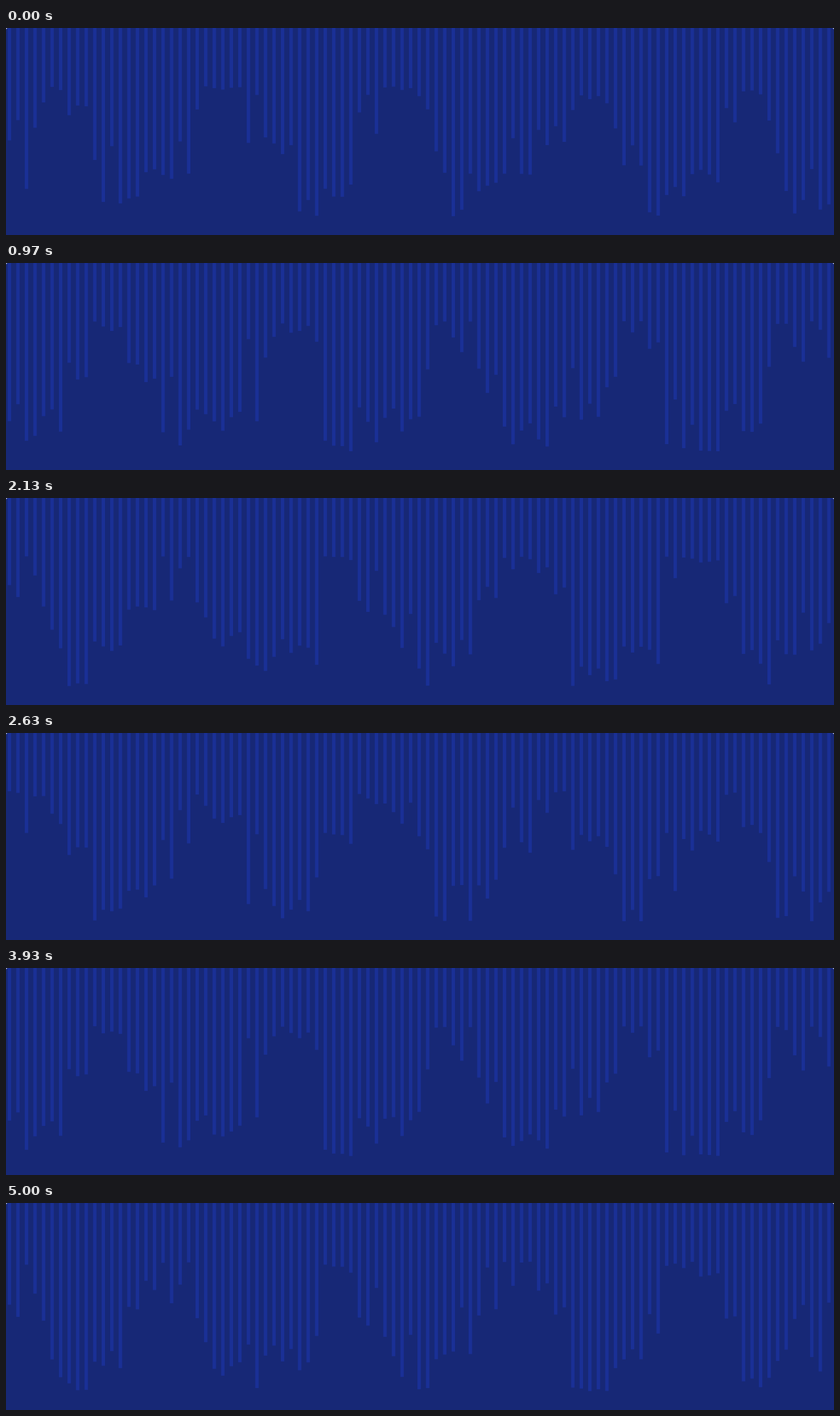
Animation of 1280 by 320 pixels, one loop 5.03 s. Source, as an HTML page with a canvas:

```html
<!DOCTYPE html>
<html lang="en">
<head>
<meta charset="utf-8">
<title>Hanging bars</title>
<style>
  html, body { margin: 0; width: 100%; height: 100%; overflow: hidden; background: #fff; }
  canvas { display: block; width: 1280px; height: 320px; border-radius: 3px 3px 0 0; }
</style>
</head>
<body>
<canvas id="stage" width="1280" height="320"></canvas>
<script>
const LOOP = 5030, CYCLE = 3000, FPS = 30;
const BARS = 97, PITCH = 1280 / BARS, LEFT = 0.2 * PITCH, WIDTH = 0.4 * PITCH;
const LEAD = 1600, LAG = 150, SPREAD = 400;

const easeIn = k => 1 - Math.cos(k * Math.PI / 2);
const easeOut = k => Math.sin(k * Math.PI / 2);
const easeBoth = k => (1 - Math.cos(k * Math.PI)) / 2;

// The cycle every bar runs through: time in ms, length in px, easing to the next key.
const KEYS = [
  [105, 176, easeOut],
  [850, 90, easeIn],
  [1185, 176, easeBoth],
  [1300, 154, easeBoth],
  [1632, 261, easeBoth],
  [1757, 225, easeBoth],
  [1925, 246, easeBoth],
  [2076, 218, easeOut],
  [2500, 291, easeBoth],
  [105 + CYCLE, 176]
];

function seeded(seed) {
  return () => {
    seed = (seed + 0x6d2b79f5) | 0;
    let n = Math.imul(seed ^ (seed >>> 15), 1 | seed);
    n = (n + Math.imul(n ^ (n >>> 7), 61 | n)) ^ n;
    return ((n ^ (n >>> 14)) >>> 0) / 4294967296;
  };
}

// Each bar trails its left neighbour, with some scatter.
const random = seeded(7);
const phases = Array.from({ length: BARS },
  (_, i) => LEAD - LAG * i + SPREAD * (2 * random() - 1));

function lengthAt(ms) {
  const first = KEYS[0][0];
  const u = first + (((ms - first) % CYCLE) + CYCLE) % CYCLE;
  const next = KEYS.findIndex(key => key[0] > u);
  const [t0, h0, ease] = KEYS[next - 1], [t1, h1] = KEYS[next];
  return h0 + (h1 - h0) * ease((u - t0) / (t1 - t0));
}

// Steps at 30 per second, with step starts rounded to 10 ms.
function stepTime(ms) {
  const tick = Math.floor(ms / 10);
  return Math.floor((tick * 3 + 1) / 10) * 1000 / FPS;
}

const ctx = document.getElementById('stage').getContext('2d');

function draw(ms) {
  const t = stepTime(ms % LOOP);
  ctx.fillStyle = '#172876';
  ctx.fillRect(0, 0, 1280, 320);
  ctx.fillStyle = '#1a3096';
  phases.forEach((phase, i) => {
    ctx.fillRect(LEFT + PITCH * i, 0, WIDTH, lengthAt(t + phase));
  });
}

const start = performance.now();
function tick() {
  draw(Math.max(0, performance.now() - start));
  requestAnimationFrame(tick);
}
tick();
</script>
</body>
</html>
```
